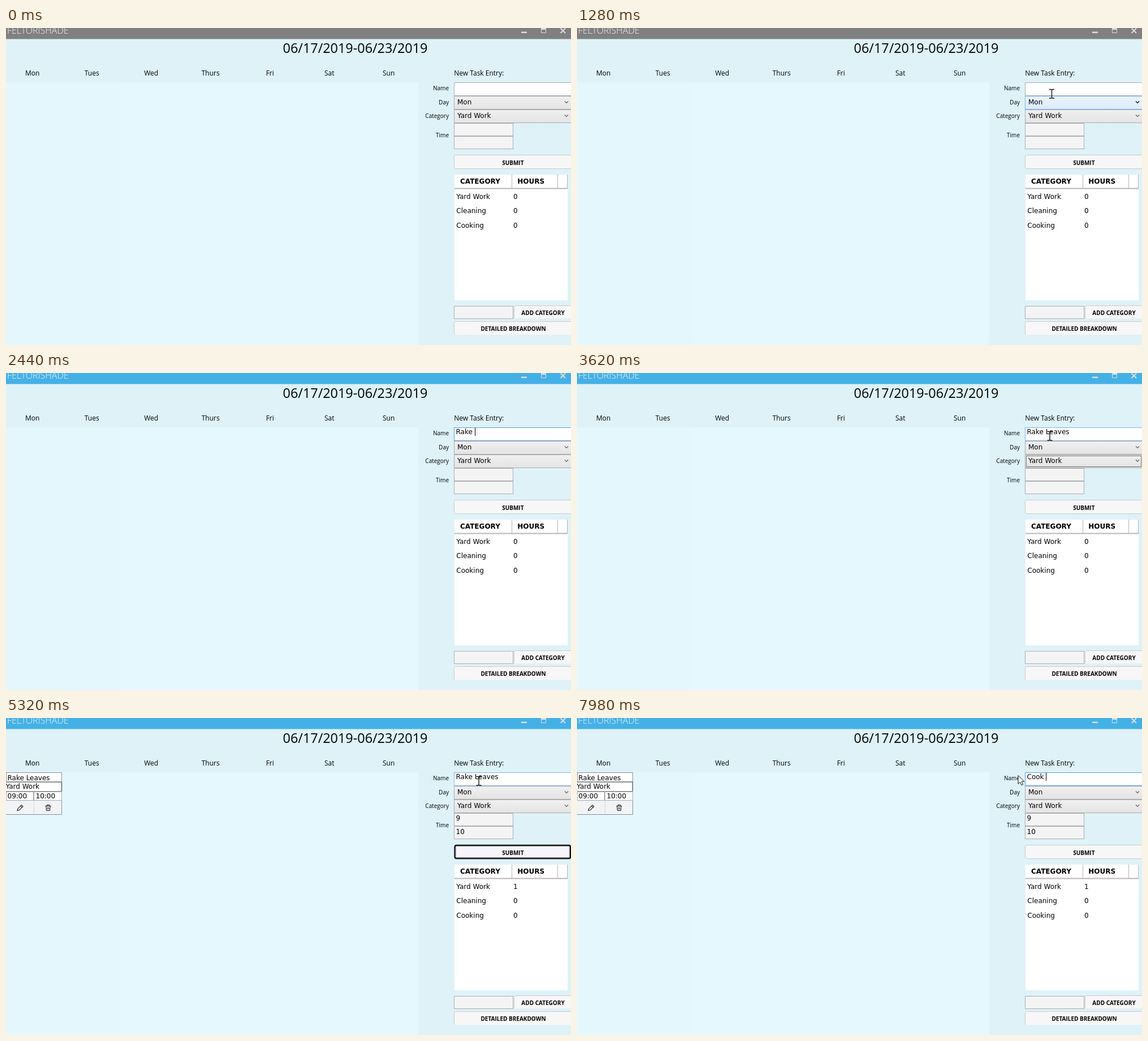
Recreate the animation shown at these times as an HTML page. Size 999 by 560 pixels, loop 8000 ms.

```html
<!DOCTYPE html>
<html lang="en">
<head>
<meta charset="utf-8">
<title>Weekly planner</title>
<style>
  html, body { margin: 0; width: 100%; height: 100%; overflow: hidden; background: #def2f8; }
  svg { display: block; }
  text { font: 12px "DejaVu Sans", sans-serif; fill: #000; white-space: pre; }
  .ui { font-family: "Open Sans", sans-serif; }
  .small { font-size: 10px; text-anchor: end; }
  .mid { text-anchor: middle; }
  .bold { font-weight: 700; }
  .btn { font-size: 10px; font-weight: 700; text-anchor: middle; }
  .date { font-size: 23.4px; text-anchor: middle; }
  .app { font-size: 16px; font-weight: 300; fill: #f2f2f2; }
</style>
</head>
<body>
<svg id="stage" width="999" height="560" viewBox="0 0 999 560">
  <defs>
    <linearGradient id="plain" x2="0" y2="1"><stop stop-color="#f0f0f0"/><stop offset="1" stop-color="#e4e4e4"/></linearGradient>
    <linearGradient id="hot" x2="0" y2="1"><stop stop-color="#ecf4fc"/><stop offset="1" stop-color="#dbebfc"/></linearGradient>
  </defs>
</svg>
<script>
const LOOP = 8000;
const stage = document.getElementById('stage');
const pen = document.createElement('canvas').getContext('2d');
pen.font = '12px "DejaVu Sans", sans-serif';
const textWidth = s => pen.measureText(s).width;

function set(el, attrs) {
  for (const key in attrs) el.setAttribute(key, attrs[key]);
  return el;
}
function add(tag, attrs, parent = stage) {
  return parent.appendChild(set(document.createElementNS('http://www.w3.org/2000/svg', tag), attrs));
}
const group = () => add('g', {});
const rect = (x, y, width, height, fill, more, parent) =>
  add('rect', { x, y, width, height, fill, ...more }, parent);
const box = (x, y, w, h, fill, stroke, more, parent) =>
  rect(x + .5, y + .5, w - 1, h - 1, fill, { stroke, ...more }, parent);
const path = (d, stroke, more, parent) => add('path', { d, stroke, fill: 'none', ...more }, parent);
function label(x, y, str, cls = '', parent) {
  const el = add('text', { x, y, class: cls }, parent);
  el.textContent = str;
  return el;
}
const show = (el, on) => el.setAttribute('visibility', on ? 'visible' : 'hidden');

// Title bar
const bar = rect(0, 0, 999, 19.5, '#808080');
label(2, 9.7, 'FELTORISHADE', 'ui app');
rect(911, 6.5, 10, 2.5, '#dedede');
path('M946.5 0V8.5H954.5V0', '#dedede');
rect(946, 0, 9, 3, '#dedede');
path('M980.5 .5L989 9M989 .5L980.5 9', '#dedede', { 'stroke-width': 2 });

// Week grid
label(617.5, 43.5, '06/17/2019-06/23/2019', 'ui date');
rect(0, 96, 204, 464, '#e3f7fd');
rect(204, 96, 525, 464, '#e5f8fe');
['Mon', 'Tues', 'Wed', 'Thurs', 'Fri', 'Sat', 'Sun'].forEach((day, i) =>
  label(46.7 + 105 * i, 83.5, day, 'ui mid'));

// Task card
const card = group();
rect(0, 96, 99, 75, '#f2f3f5', {}, card);
box(0, 96, 99, 17, '#fff', '#8c8f94', {}, card);
box(-1, 113, 100, 17, '#fff', '#8c8f94', {}, card);
path('M98.5 113V129', '#333', {}, card);
box(0, 130, 49, 16, '#fff', '#a6a8ac', {}, card);
box(49, 130, 50, 16, '#fff', '#a6a8ac', {}, card);
path('M49.5 146V170', '#d5d7da', {}, card);
path('M98.5 146V170.5H0', '#8c8f94', {}, card);
label(2.5, 109.5, 'Rake Leaves', '', card);
label(-.5, 125.3, 'Yard Work', '', card);
label(2.5, 142, '09:00', '', card);
label(52.5, 142, '10:00', '', card);
path('M20 163.5L20.8 160.2L27.3 153.7L30 156.3L23.4 162.8ZM25.7 155.3L28.4 158', '#111', { 'stroke-width': 1.1 }, card);
path('M69.5 155.5H79.5M72.5 155V153.5H76.5V155M70.8 156L71.5 163.5H77.5L78.2 156M73.3 157.5V161.5M75.6 157.5V161.5', '#111', {}, card);

// Entry form
label(792.3, 83.5, 'New Task Entry:', 'ui');
[['Name', 110], ['Day', 134.5], ['Category', 158.5], ['Time', 193]].forEach(([s, y]) =>
  label(783, y, s, 'ui small'));

function field(y, h, w, fill) {
  return { y, h, w, box: box(792, y, w, h, fill, '#abadb3') };
}
function combo(y, str) {
  const c = { y, h: 24, w: 212, combo: true, box: box(792, y, 212, 24, 'url(#plain)', '#acacac') };
  label(798, y + 15, str);
  c.arrow = path(`M988 ${y + 9.5}l3 3l3 -3`, '#606060', { 'stroke-width': 1.2 });
  c.dots = rect(794.5, y + 2.5, 203, 19, 'none', { stroke: '#000', 'stroke-dasharray': '1 1' });
  return c;
}
const parts = {
  name: field(96, 24, 212, '#fff'),
  day: combo(120, 'Mon'),
  cat: combo(144, 'Yard Work'),
  from: field(168, 23, 105, '#f4f4f4'),
  to: field(191, 23, 105, '#f4f4f4'),
  extra: field(491, 23, 105, '#f4f4f4')
};
const mark = rect(0, 97, 0, 14, '#8fc6fa');
const texts = {
  name: label(795.5, 108, ''),
  from: label(795.5, 181, ''),
  to: label(795.5, 205, '')
};

// Buttons
const submit = box(792, 224, 212, 25, '#f7f7f7', '#cacaca', { rx: 3 });
const ring = group();
rect(793.5, 224.8, 204.5, 23.4, '#f7f5fa', { rx: 3, stroke: '#000', 'stroke-width': 2 }, ring);
rect(795.2, 226.4, 201, 20, 'none', { stroke: '#000', 'stroke-dasharray': '1 1' }, ring);
label(896.3, 241.5, 'SUBMIT', 'ui btn');
function openButton(x, y, h, cx, str) {
  path(`M${x + .5} ${y + h}V${y + 3.5}q0 -3 3 -3H1000V${y + h}`, '#cacaca', { fill: '#f7f7f7' });
  label(cx, y + 17, str, 'ui btn');
}
openButton(898, 490, 23, 949.5, 'ADD CATEGORY');
openButton(792, 518, 24, 897, 'DETAILED BREAKDOWN');

// Totals table
rect(793, 259, 200, 222, '#fff');
rect(793, 282.5, 200, 2, '#b8b8b8');
[894, 975, 992].forEach(x => rect(x, 259, 1, 24, '#b4b4b4'));
label(803, 275, 'CATEGORY', 'bold');
label(904.3, 275, 'HOURS', 'bold');
const hours = ['Yard Work', 'Cleaning', 'Cooking'].map((s, i) => {
  const y = 302 + 25.4 * i;
  label(796.3, y, s);
  return label(897, y, '0');
});

// Caret and pointer
const caret = rect(0, 97, 1, 14, '#000');
const pointer = group();
const glow = add('circle', { r: 11, fill: '#fbe438', 'fill-opacity': .72 }, pointer);
const beam = path('M-4.5 -7.5H-1.5L0 -6.5L1.5 -7.5H4.5M0 -6.5V7M-4.5 8H-1.5L0 7L1.5 8H4.5', '#111', { 'stroke-width': 1.4 }, pointer);
const arrow = path('M.5 .5V15.5L4 12.2L6.4 17.6L9 16.4L6.6 11.2H11.2Z', '#111', { fill: '#fff' }, pointer);

// Changes that take hold at a given time
const steps = [
  [0, { active: false, focus: '', name: '', from: '', to: '', done: false, press: false, hidden: false, hot: null, select: false }],
  [1280, { hot: 'day' }], [1350, { hot: null }],
  [1420, { press: true, active: true, focus: 'name' }],
  [1670, { press: false }],
  [1980, { hidden: true }],
  [2060, { name: 'R' }], [2130, { name: 'Ra' }], [2210, { name: 'Rak' }],
  [2360, { name: 'Rake' }], [2440, { name: 'Rake ' }], [2600, { name: 'Rake L' }],
  [2780, { name: 'Rake Le' }], [2850, { name: 'Rake Lea' }], [2920, { name: 'Rake Leav' }],
  [3070, { name: 'Rake Leave' }], [3150, { name: 'Rake Leaves' }],
  [3380, { focus: 'day', hidden: false }],
  [3620, { focus: 'cat' }],
  [3930, { focus: 'from' }], [4170, { from: '9' }],
  [4630, { focus: 'to' }], [4790, { to: '1' }], [4860, { to: '10' }],
  [5090, { focus: 'submit' }],
  [5320, { done: true }],
  [6330, { press: true, focus: 'name' }],
  [6570, { select: true }],
  [7200, { press: false }],
  [7660, { name: 'C', select: false }],
  [7830, { name: 'Coo' }], [7910, { name: 'Cook' }], [7980, { name: 'Cook ' }]
];

// Pointer moves: start, end, step count, from, to
const moves = [
  [270, 960, 10, [848, 503], [842, 156]],
  [1280, 1590, 5, [839.5, 116], [836, 111]],
  [6100, 6410, 5, [838, 111], [881, 105]],
  [6570, 7120, 8, [829, 107], [779.5, 101]]
];

function stateAt(t) {
  const s = {};
  for (const [at, change] of steps) if (t >= at) Object.assign(s, change);
  return s;
}

function pointerAt(t) {
  const move = moves.filter(m => t >= m[0]).pop();
  if (!move) return null;
  const [start, end, count, a, b] = move;
  const p = Math.min(1, Math.floor((t - start) / (end - start) * (count - 1) + .001) / (count - 1));
  const k = 1 - (1 - p) ** 1.6;
  return [0, 1].map(i => a[i] + (b[i] - a[i]) * k);
}

function nearestIndex(str, x) {
  let best = 0;
  const gap = i => Math.abs(795.5 + textWidth(str.slice(0, i)) - x);
  for (let i = 1; i <= str.length; i++) if (gap(i) < gap(best)) best = i;
  return best;
}

function render(t) {
  const s = stateAt(t), pos = pointerAt(t);
  const over = (y, h, w) => pos && pos[0] >= 792 && pos[0] < 792 + w && pos[1] >= y && pos[1] < y + h;
  bar.setAttribute('fill', s.active ? '#44b1e6' : '#808080');

  let onText = false;
  for (const id in parts) {
    const p = parts[id], inside = over(p.y, p.h, p.w);
    const hot = s.hot ? s.hot === id : inside && !s.hidden;
    if (p.combo) {
      set(p.box, { fill: hot ? 'url(#hot)' : 'url(#plain)', stroke: hot ? '#7eb4ea' : '#acacac' });
      p.arrow.setAttribute('stroke', hot ? '#000' : '#606060');
      show(p.dots, s.focus === id);
    } else {
      p.box.setAttribute('stroke', s.focus === id ? '#569de5' : hot ? '#7eb4ea' : '#abadb3');
      onText = onText || inside;
    }
  }
  for (const id in texts) texts[id].textContent = s[id];

  show(mark, s.select);
  if (s.select) {
    const x = 795.5 + textWidth(s.name.slice(0, nearestIndex(s.name, pos[0])));
    set(mark, { x, width: 795.5 + textWidth(s.name) - x });
  }
  show(caret, s.focus in texts && !s.select);
  if (s.focus in texts) {
    set(caret, { x: Math.round(795.5 + textWidth(s[s.focus])), y: parts[s.focus].y + 1 });
  }

  submit.setAttribute('fill', over(224, 25, 212) ? '#ececec' : '#f7f7f7');
  show(ring, s.focus === 'submit');
  show(card, s.done);
  hours[0].textContent = s.done ? '1' : '0';

  const seen = pos && !s.hidden;
  const beamOn = onText || s.press;
  if (pos) pointer.setAttribute('transform', `translate(${pos})`);
  show(glow, seen && s.press);
  show(beam, seen && beamOn);
  show(arrow, seen && !beamOn);
}

const begin = performance.now();
function tick() {
  render((performance.now() - begin) % LOOP);
  requestAnimationFrame(tick);
}
tick();
</script>
</body>
</html>
```
